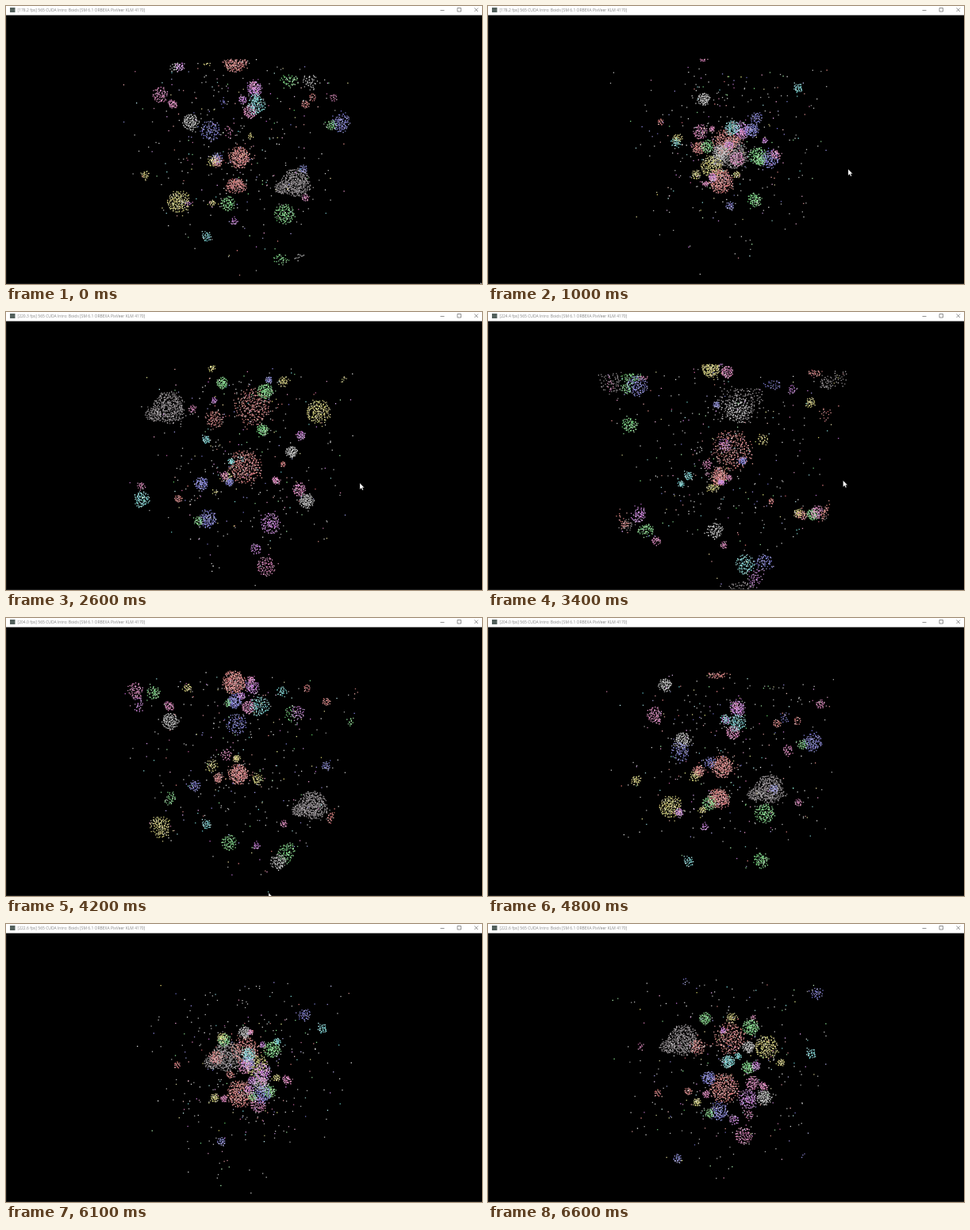
These frames come from a looping animation (600 px wide and 351 px high, 6700 ms). An HTML page with a canvas:

```html
<!DOCTYPE html>
<html lang="en">
<head>
<meta charset="utf-8">
<title>Boids</title>
<style>
  html, body { margin: 0; width: 100%; height: 100%; overflow: hidden; background: #000; }
  svg, canvas { position: absolute; left: 0; top: 0; display: block; }
  text { font: 5px "Open Sans", "Noto Sans", sans-serif; fill: #858585; }
</style>
</head>
<body>
<canvas id="stage" width="600" height="351"></canvas>
<svg width="600" height="351" viewBox="0 0 600 351">
  <path d="M.5 12V351M0 350.5H600" stroke="#1c1c1c" fill="none"/>
  <rect width="600" height="11.6" fill="#fff"/>
  <rect x="5" y="2" width="6.5" height="6" fill="#53605c"/>
  <text id="title" x="14.5" y="7"></text>
  <path d="M547.5 5.5h5M569 2.5h4.5v4.5h-4.5zM590.5 2.5l4.5 4.5m0-4.5l-4.5 4.5" stroke="#777" stroke-width=".8" fill="none"/>
  <path id="cursor" d="M0 0V8L1.9 6.3L3.1 9L4.4 8.4L3.2 5.8H5.6Z" fill="#fff" stroke="#222" stroke-width=".3"/>
</svg>
<script>
const LOOP = 6700, STEP = 100;

// The boids live in a cube from -1 to 1 that wraps round on every axis.
const PERIOD = 4.6, MEETING = 1.3;         // seconds to cross the cube; moment the flocks meet in the middle
const SPEED = 2 / PERIOD;
const TURN = 0.7, TILT = 1.22, DISTANCE = 4, FOCAL = 409;
const [turnSin, turnCos, tiltSin, tiltCos] = [Math.sin(TURN), Math.cos(TURN), Math.sin(TILT), Math.cos(TILT)];

const HUES = { red: 0, yellow: 56, green: 125, cyan: 180, blue: 241, violet: 288, pink: 322 };
const NAMES = Object.keys(HUES);
// Every flock flies along a diagonal: left, right, near or far, and up or down.
const SIDES = { R: [1, 1], L: [-1, -1], N: [-1, 1], F: [1, -1] };
const LIFTS = { U: 1, D: -1 };

const ctx = document.getElementById('stage').getContext('2d');
const title = document.getElementById('title');
const cursor = document.getElementById('cursor');

let seed = 1060;
function rand() {
  seed = (seed * 1664525 + 1013904223) >>> 0;
  return seed / 4294967296;
}
const spread = r => (rand() + rand() + rand() - 1.5) * r;
const pick = list => list[Math.floor(rand() * list.length)];
const wrap = v => ((v + 1) % 2 + 2) % 2 - 1;
const mix = (a, b, u) => a + (b - a) * u;

function tint(name) {
  const light = spread(10);
  if (name === 'gray') return `hsl(330 3% ${64 + light}%)`;
  if (name === 'white') return `hsl(0 0% ${82 + light}%)`;
  return `hsl(${HUES[name] + spread(10)} 66% ${76 + light}%)`;
}

const boids = [];
// Place is [right, up, near] as the viewer sees it at the meeting.
function addBoid(color, heading, [right, up, near]) {
  const [sideX, sideZ] = SIDES[heading[0]];
  boids.push({
    x: right * turnSin - near * turnCos, y: up, z: right * turnCos + near * turnSin,
    vx: sideX * SPEED, vy: LIFTS[heading[1]] * SPEED, vz: sideZ * SPEED,
    color: tint(color), alpha: 0.75 + 0.25 * rand()
  });
}

function addFlock(color, heading, size, ...center) {
  const radius = 0.0098 * Math.sqrt(size);
  for (let i = 0; i < size; i++) {
    const up = 1 - 2 * (i + 0.5) / size, ring = Math.sqrt(1 - up * up), angle = i * 2.39996;
    const r = radius * Math.cbrt(rand()) * (rand() < 0.06 ? 1.4 : 1);
    const offset = [ring * Math.cos(angle), up, ring * Math.sin(angle)];
    addBoid(color, heading, offset.map((v, axis) => center[axis] + v * r));
  }
}

addFlock('gray', 'LU', 400, -0.09, 0.02, -0.13);
addFlock('gray', 'LU', 90, -0.29, -0.06, -0.13);
addFlock('yellow', 'RU', 190, 0.02, 0.04, 0.29);
addFlock('red', 'NU', 270, 0.01, 0.26, 0.27);
addFlock('red', 'NU', 330, -0.06, -0.43, -0.1);
addFlock('red', 'NU', 85, -0.34, 0.1, 0.03);
addFlock('green', 'FU', 130, 0.37, 0.09, -0.08);
addFlock('green', 'FU', 75, -0.24, 0.2, -0.11);
addFlock('green', 'FU', 85, 0.34, -0.45, 0.03);
addFlock('white', 'RD', 125, 0.11, -0.29, -0.36);
addFlock('white', 'RD', 90, -0.11, 0.39, -0.57);
addFlock('violet', 'ND', 130, 0.22, 0.03, -0.11);
addFlock('pink', 'ND', 95, 0.15, -0.2, 0.31);
addFlock('blue', 'LD', 130, 0.34, -0.2, 0.16);
addFlock('blue', 'LD', 100, 0.18, -0.06, -0.6);
addFlock('cyan', 'FD', 110, 0.07, 0.03, -0.6);
addFlock('pink', 'RD', 80, -0.11, 0.16, 0.18);
addFlock('yellow', 'RU', 40, -0.37, 0.36, 0.24);

// Small flocks and loners
const randomHeading = () => pick('RLNF') + pick('UD');
for (let i = 0; i < 16; i++) {
  addFlock(pick(NAMES), randomHeading(), 18 + Math.floor(rand() * 34), spread(0.9), spread(0.8), spread(0.9));
}
for (let i = 0; i < 330; i++) {
  addBoid(rand() < 0.5 ? 'white' : pick(NAMES), randomHeading(), [spread(1.3), spread(1.2), spread(1.3)]);
}

function drawBoid(b, t) {
  const x = wrap(b.x + b.vx * t), y = wrap(b.y + b.vy * t), z = wrap(b.z + b.vz * t);
  const right = x * turnSin + z * turnCos, near = z * turnSin - x * turnCos;
  const scale = FOCAL / (DISTANCE - near * tiltSin - y * tiltCos);
  ctx.globalAlpha = b.alpha;
  ctx.fillStyle = b.color;
  ctx.fillRect(299.4 + right * scale, 180.9 - (y * tiltSin - near * tiltCos) * scale, 1.3, 1.3);
}

const RATES = ['178.2', '214.8', '220.3', '224.4', '204.0', '220.6', '222.6'];
// Cursor stops: [seconds, x, y]
const STOPS = [[0, 598, 349], [0.7, 454, 206], [1.2, 454, 206], [2.6, 446, 216], [3.6, 448, 212], [4.2, 331, 347], [4.4, 326, 356]];

function cursorAt(t) {
  const next = STOPS.findIndex(stop => stop[0] > t);
  if (next < 0) return STOPS[STOPS.length - 1].slice(1);
  const [t0, x0, y0] = STOPS[next - 1], [t1, x1, y1] = STOPS[next];
  const u = (t - t0) / (t1 - t0);
  return [mix(x0, x1, u), mix(y0, y1, u)];
}

function draw(t) {
  ctx.globalAlpha = 1;
  ctx.fillStyle = '#000';
  ctx.fillRect(0, 0, 600, 351);
  for (const b of boids) drawBoid(b, t - MEETING);

  const fps = RATES[Math.max(0, Math.floor(t - 0.1))];
  title.textContent = `[${fps} fps] 565 CUDA Intro: Boids [SM 6.1 ORBEXA PixVeer KLM 4170]`;
  cursor.setAttribute('transform', `translate(${cursorAt(t).join(' ')})`);
}

const start = performance.now();
function tick() {
  const ms = (performance.now() - start) % LOOP;
  draw(Math.floor(ms / STEP) * STEP / 1000);
  requestAnimationFrame(tick);
}
tick();
</script>
</body>
</html>
```
